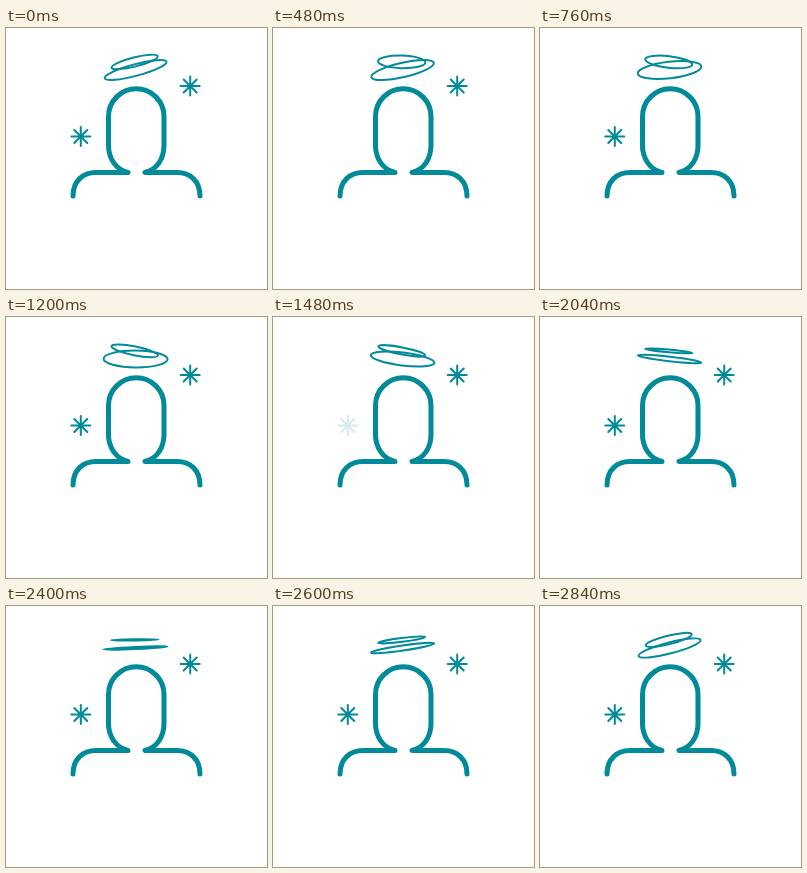
An HTML page that plays this animation: 261 by 261 pixels, repeating every 2880 ms.

```html
<!DOCTYPE html>
<html lang="en">
<head>
<meta charset="utf-8">
<title>Halo</title>
<style>
  html, body { margin: 0; height: 100%; overflow: hidden; background: #fff; }
  svg { display: block; width: 100%; height: 100%; }
  g { fill: none; stroke: #008a9a; stroke-linecap: round; stroke-width: 2; }
  .person { stroke-width: 5; stroke-linejoin: round; }
</style>
</head>
<body>
<svg viewBox="0 0 261 261">
  <defs>
    <path id="star" d="M0-9.5V9.5M-9.5 0H9.5M-6.5-6.5L6.5 6.5M-6.5 6.5L6.5-6.5"/>
  </defs>
  <g class="person">
    <path d="M67 168C67 153 77 144.5 90 144.5H122C110 141.500 102.500 131 102.500 117V88.500A27.750 27.750 0 0 1 158 88.500V117C158 131 151 141.500 139 144.500H171C184 144.500 194 153 194 168"/>
  </g>
  <g>
    <ellipse id="bigRing" rx="32"/>
    <ellipse id="smallRing" rx="23.7"/>
    <use id="leftStar" href="#star" x="74.8" y="108.500"/>
    <use id="rightStar" href="#star" x="184.200" y="58"/>
  </g>
</svg>
<script>
const LOOP = 2880, STEP = 40;
const byId = id => document.getElementById(id);

// Poses: time in ms, tilt in degrees, half height of the ring
const rings = [
  { node: byId('bigRing'), x: 129.6, y: 42, poses: [
    [0, -15, 5.8], [480, -13, 7.2], [760, -6.500, 8.2],
    [1200, 0.500, 8.4], [1760, 10.500, 4.2], [2400, -2.700, 1]] },
  { node: byId('smallRing'), x: 128.700, y: 33.900, poses: [
    [0, -14, 4.6], [480, 1.500, 6.3], [760, 6.500, 5.800],
    [1200, 11.500, 4.400], [1760, 8.500, 2.600], [2400, -0.800, 0.600]] }
];

const stars = [
  { node: byId('leftStar'), blinks: [480, 1440] },
  { node: byId('rightStar'), blinks: [760, 1720] }
];

// Smooth periodic curve through one column of the poses
function sample(poses, column, t) {
  const n = poses.length;
  const key = i => {
    const turn = Math.floor(i / n), pose = poses[i - turn * n];
    return [pose[0] + turn * LOOP, pose[column]];
  };
  let i = n - 1;
  while (poses[i][0] > t) i--;
  const [a, b, c, d] = [-1, 0, 1, 2].map(k => key(i + k));
  const span = c[0] - b[0], u = (t - b[0]) / span;
  const slopeB = (c[1] - a[1]) / (c[0] - a[0]) * span;
  const slopeC = (d[1] - b[1]) / (d[0] - b[0]) * span;
  const ease = u * u * (3 - 2 * u);
  return b[1] + (c[1] - b[1]) * ease
    + slopeB * u * (1 - u) ** 2 - slopeC * u * u * (1 - u);
}

function draw(now) {
  const t = Math.floor(now % LOOP / STEP) * STEP;
  for (const { node, x, y, poses } of rings) {
    node.setAttribute('ry', Math.max(0.4, sample(poses, 2, t)));
    node.setAttribute('transform', `translate(${x} ${y}) rotate(${sample(poses, 1, t)})`);
  }
  for (const { node, blinks } of stars) {
    const distance = Math.min(...blinks.map(b => Math.abs(t - b)));
    node.setAttribute('opacity', Math.min(1, distance / 240));
  }
}

const start = performance.now();
function tick() {
  draw(performance.now() - start);
  requestAnimationFrame(tick);
}
tick();
</script>
</body>
</html>
```
